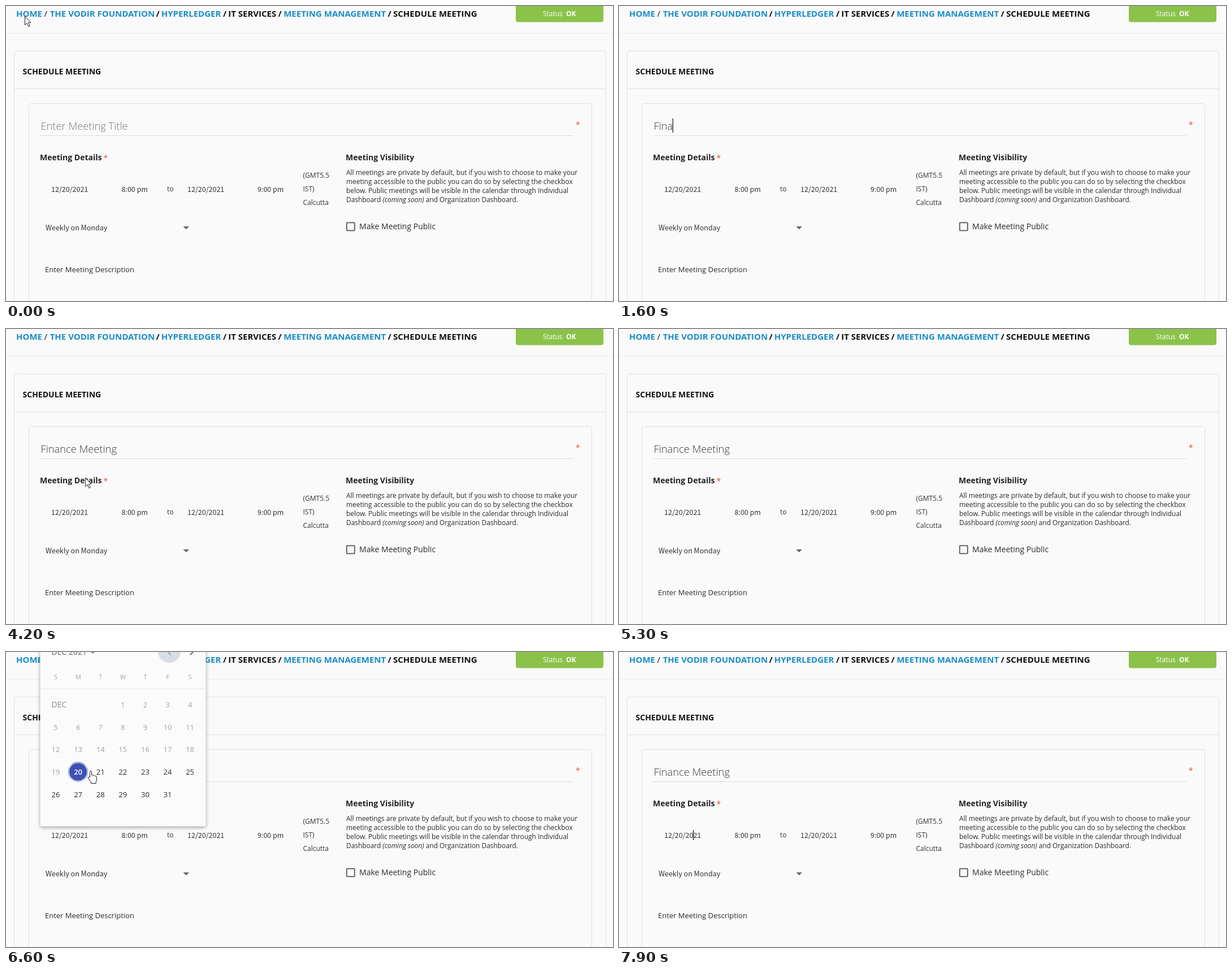
An HTML page that plays this animation: 1074 px wide and 522 px high, repeating every 8000 ms.

```html
<!DOCTYPE html>
<html lang="en">
<head>
<meta charset="utf-8">
<title>Schedule meeting</title>
<style>
  html, body { margin: 0; width: 100%; height: 100%; overflow: hidden; background: #fafafa; }
  svg { display: block; width: 100%; height: 100%; font-family: "Open Sans", "Noto Sans", sans-serif; }
  text { white-space: pre; fill: #2b2b2b; }
  .crumb { font-size: 15px; font-weight: 700; fill: #111; }
  .crumb.link { fill: #1b8dc8; }
  .head { font-size: 14px; font-weight: 700; fill: #111; }
  .label { font-size: 14px; font-weight: 700; fill: #222; }
  .field { font: 12.5px "Noto Sans CJK JP", "Noto Sans CJK SC", "Open Sans", sans-serif; fill: #333; }
  .note { font-size: 11.9px; }
  .zone { font-size: 12px; fill: #333; }
  .star { fill: #ee4b45; font-size: 14px; }
  .title { font-size: 18.3px; font-weight: 300; }
  .day { font-size: 13px; text-anchor: middle; }
  .off { fill: #a3a3a3; }
  .line { fill: none; stroke: #d8e4ea; }
  #popup { filter: drop-shadow(0 2px 3px rgba(0, 0, 0, .36)); }
</style>
</head>
<body>
<svg viewBox="0 0 1074 522" preserveAspectRatio="none">
  <rect width="1074" height="522" fill="#fafafa"/>
  <path class="line" d="M0 48.5H1074" style="stroke:#ebebeb"/>
  <rect class="line" x="14.5" y="79.5" width="1047" height="480" rx="4"/>
  <path class="line" d="M15 146.5H1061"/>
  <rect class="line" x="40.5" y="172.5" width="996" height="400" rx="4"/>
  <path class="line" d="M60 229.5H1004" style="stroke:#dcdcdc"/>
  <rect x="902" y="-6" width="155" height="34.5" rx="4" fill="#8bc34a"/>
  <text x="950" y="18" font-size="12" style="fill:#fff">Status <tspan font-weight="700" x="991">OK</tspan></text>
  <g id="page"></g>
  <text class="note" x="602" y="299">All meetings are private by default, but if you wish to choose to make your<tspan x="602" dy="16">meeting accessible to the public you can do so by selecting the checkbox</tspan><tspan x="602" dy="16">below. Public meetings will be visible in the calendar through Individual</tspan><tspan x="602" dy="16">Dashboard </tspan><tspan font-style="italic">(coming soon)</tspan> and Organization Dashboard.</text>
  <rect x="602.8" y="383.3" width="14" height="14" rx="1" fill="none" stroke="#555" stroke-width="1.8"/>
  <path d="M313.5 390h10.5l-5.25 5.3z" fill="#666"/>
  <text id="title" class="title" x="61.5" y="219"></text>
  <path id="caret" fill="none" stroke="#111" stroke-width="1.2"/>
  <g id="popup">
    <rect x="60.5" y="-40" width="293" height="348.5" rx="3" fill="#fbfbfb"/>
    <text x="80.5" y="4.5" font-size="14" style="fill:#666">DEC 2021</text>
    <path d="M149-1.5h9l-4.500 4.500z" fill="#777"/>
    <circle cx="289" cy="-1" r="20" fill="#d9dde4"/>
    <path d="M291.500-7l-6 6 6 6" fill="none" stroke="#9a9da5" stroke-width="1.8"/>
    <path d="M326-7l6 6-6 6" fill="none" stroke="#666" stroke-width="1.8"/>
    <path d="M61 65.500H353" stroke="#e4e4e4"/>
    <text x="80.500" y="98" font-size="14" style="fill:#8a8a8a">DEC</text>
    <circle cx="127.500" cy="212" r="17.500" fill="#3f51b5"/>
    <circle cx="127.500" cy="212" r="16.300" fill="none" stroke="#fff" stroke-width="1.100"/>
    <g id="days"></g>
  </g>
  <g id="pointer">
    <path id="arrow" d="M.5.5V15.500L4 12.200 6.700 18.500 9.200 17.400 6.500 11.300H11z" fill="#fff" stroke="#222" stroke-linejoin="round"/>
    <path id="hand" d="M-3.500 11V1.500Q-3.500-.5-2-.5T-.5 1.500V7Q1.500 5.500 2.500 7.500 4.500 6.500 5.500 8.500 8.500 7.500 8.500 10.500V15Q8.500 17 7 19V21.500H-1.500V19.500L-6.500 12.500Q-7.500 10-5.500 10Z" fill="#fff" stroke="#222" stroke-linejoin="round"/>
    <path id="beam" d="M0-5V4" stroke="#fafafa" stroke-width="1.300"/>
  </g>
</svg>
<script>
const $ = id => document.getElementById(id);

function addText(parent, x, y, cls, str) {
  const el = document.createElementNS("http://www.w3.org/2000/svg", "text");
  el.setAttribute("x", x);
  el.setAttribute("y", y);
  el.setAttribute("class", cls);
  el.textContent = str;
  parent.append(el);
  return el;
}

const put = (x, y, cls, str) => addText($("page"), x, y, cls, str);

[[18, "HOME"], [77.7, "THE VODIR FOUNDATION"], [274.7, "HYPERLEDGER"], [491.2, "MEETING MANAGEMENT"]]
  .forEach(([x, s]) => put(x, 19, "crumb link", s));
[[265.5, "/"], [384, "/"], [393.2, "IT SERVICES"], [481.5, "/"], [675.5, "/"], [685, "SCHEDULE MEETING"]]
  .forEach(([x, s]) => put(x, 19, "crumb", s));
put(67.5, 19, "crumb", "/").style.fontWeight = 400;
put(29.5, 121, "head", "SCHEDULE MEETING");
put(60, 273, "label", "Meeting Details");
put(172.5, 274, "star", "*");
put(1008, 215, "star", "*");
put(601, 273, "label", "Meeting Visibility");
[[80, "12/20/2021"], [204.5, "8:00 pm"], [321, "12/20/2021"], [445, "9:00 pm"]]
  .forEach(([x, s]) => put(x, 329, "field", s));
put(285, 328, "zone", "to");
["(GMT5.5", "IST)", "Calcutta"].forEach((s, i) => put(525.5, 304 + 24 * i, "zone", s));
put(70, 397, "field", "Weekly on Monday");
put(69, 470.5, "", "Enter Meeting Description").style.fontSize = "13px";
put(625, 395, "", "Make Meeting Public").style.fontSize = "14px";

const colX = c => 88 + 39.6 * c;
[..."SMTWTFS"].forEach((s, c) => addText($("days"), colX(c), 48, "day off", s).style.fontSize = "11px");
for (let d = 1; d <= 31; d++) {
  const cell = d + 2;
  const el = addText($("days"), colX(cell % 7), 98 + 39.7 * Math.floor(cell / 7), d < 20 ? "day off" : "day", d);
  if (d === 20) { el.style.fill = "#fff"; el.style.fontWeight = 600; }
}

const TITLE = "Finance Meeting";
const KEYS = [1200, 1300, 1400, 1600, 1700, 1800, 2100, 2200, 2500, 2600, 2800, 3200, 3400, 3500, 3600];
const TITLE_CARET = [[600, 1000], [1200, 4100], [4600, 5200]];
const DATE_CARET = [[5500, 5700], [7800, 8000]];

// Pointer moves: shape, then [time, x, y] waypoints; the last pair ends the span.
const MOVES = [
  ["arrow", [0, 33, 18], [100, 48, 60], [300, 112, 170], [400, 124, 196]],
  ["arrow", [4200, 140, 263], [4400, 180, 300], [4600, 248, 350], [4800, 190, 348], [5000, 282, 348], [5200, 175, 340], [5300, 150, 332]],
  ["beam", [5300, 144, 324], [5900, 144, 324]],
  ["hand", [6200, 150, 235], [6300, 132, 200]],
  ["arrow", [6300, 122, 120], [6400, 115, 30], [6500, 140, 130], [6600, 150, 190]],
  ["hand", [6600, 152, 211], [6700, 185, 245], [6800, 210, 270]],
  ["arrow", [6800, 220, 295], [6900, 232, 328], [7000, 232, 328], [7200, 218, 308], [7400, 224, 321], [7500, 224, 321], [7700, 300, 325], [7800, 312, 325]],
  ["beam", [7800, 350, 324], [7900, 377, 324], [8000, 377, 324]],
];

const within = (t, spans) => spans.some(([a, b]) => t >= a && t < b);

function pointerAt(t) {
  for (const [shape, ...pts] of MOVES) {
    const i = pts.findIndex((p, k) => k + 1 < pts.length && t >= p[0] && t < pts[k + 1][0]);
    if (i < 0) continue;
    const [a, b] = [pts[i], pts[i + 1]];
    const f = (t - a[0]) / (b[0] - a[0]);
    return { shape, x: a[1] + (b[1] - a[1]) * f, y: a[2] + (b[2] - a[2]) * f };
  }
  return { shape: "", x: 0, y: 0 };
}

function popupAlpha(t) {
  if (t < 5900 || t >= 7700) return 0;
  return t < 6000 ? 0.5 : t < 7600 ? 1 : 0.5;
}

function render(now) {
  const t = Math.floor(now % 8000 / 100) * 100;
  const typed = KEYS.filter(k => k <= t).length;
  const title = $("title");
  title.textContent = typed ? TITLE.slice(0, typed) : "Enter Meeting Title";
  title.style.fill = typed ? "#383838" : "#777";

  let caret = "";
  if (within(t, TITLE_CARET)) {
    const x = typed ? 61.5 + title.getComputedTextLength() : 62.5;
    caret = `M${x} 199V224`;
  } else if (within(t, DATE_CARET)) caret = "M131.500 315V333";
  $("caret").setAttribute("d", caret);

  const alpha = popupAlpha(t);
  $("popup").style.opacity = alpha;
  $("popup").style.display = alpha ? "" : "none";

  const p = pointerAt(t);
  for (const id of ["arrow", "hand", "beam"]) $(id).style.display = id === p.shape ? "" : "none";
  $("pointer").setAttribute("transform", `translate(${Math.round(p.x)} ${Math.round(p.y)})`);
}

function loop() {
  render(performance.now());
  requestAnimationFrame(loop);
}
loop();
</script>
</body>
</html>
```
